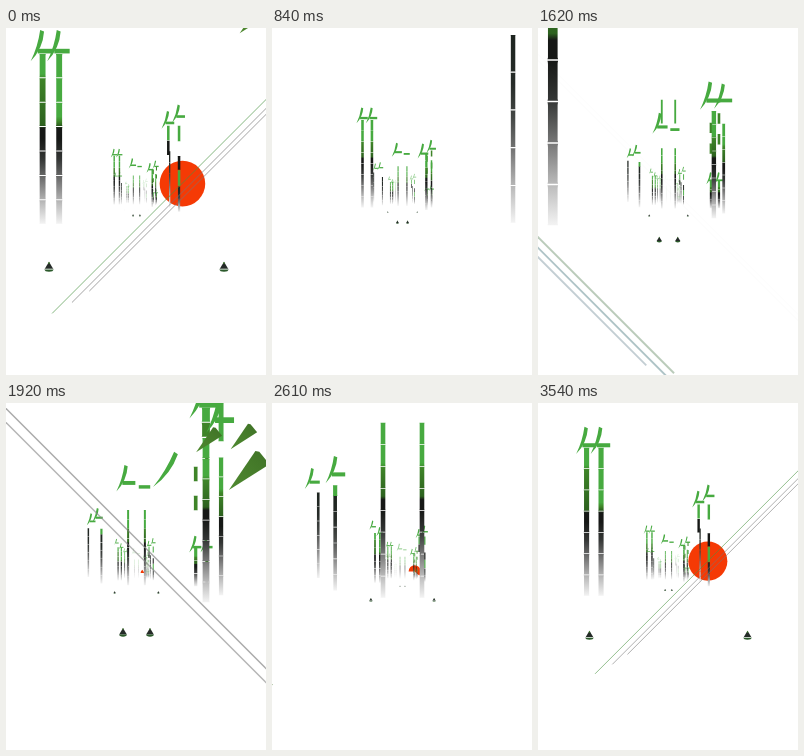
Recreate the animation shown at these times as an HTML page with a canvas. Size 260x347 px, loop 3.57 s.

```html
<!DOCTYPE html>
<html lang="en">
<head>
<meta charset="utf-8">
<title>Bamboo flight</title>
<style>
  html, body { margin: 0; width: 100%; height: 100%; overflow: hidden; background: #fff; }
  canvas { display: block; width: 260px; height: 347px; }
</style>
</head>
<body>
<canvas id="stage" width="260" height="347"></canvas>
<script>
const ctx = document.getElementById('stage').getContext('2d');
const LOOP = 3570, STEP = 30, CYCLE = 3.6;
const CX = 130.5, CY = 173;
const GREEN = '#47aa40', LEAF = '#3e8428', INK = '#161816';

const clamp = (v, a = 0, b = 1) => Math.min(b, Math.max(a, v));
const mix = (a, b, k) => a + (b - a) * k;
const mod = (v, n) => ((v % n) + n) % n;

// World units are pixels seen from one second away; `pass` is when the camera reaches the object.
// head: [time left, dx, y] at the start and the end of its drift; bars: [top, bottom, fill, nearest, farthest]
const stalks = [
  { x: -38.5, pass: .41, top: -60.5, base: 9.5, n: 7, green: .85, head: [1.07, -3, -69, .5, 0, -61.5] },
  { x: -31.7, pass: .41, top: -60.5, base: 9.5, n: 7, green: .6, head: [1.07, 0, -60, .5, 0, -61.5] },
  { x: 34.6, pass: 1.088, size: 1.5, head: [1.09, 0, -85, .73, 0, -85], bars: [[-82, -66, GREEN], [-65.5, -50, INK]] },
  { x: 39.8, pass: 1.2, top: -60, base: 8, n: 5, w: 1.6, dark: true },
  { x: 46.3, pass: 1.088, top: -16, base: 12, n: 2, size: 1.5, dark: true, head: [1.09, 0, -92, .73, 0, -86],
    bars: [[-82, -65, GREEN], [-49, -34, INK], [-33.5, -16.5, GREEN]] },
  { x: -42.4, pass: 1.9, top: -86, base: 7, n: 8, w: 2.7, size: 1.3, head: [1, 0, -88, .5, 0, -88] },
  { x: -32.4, pass: 1.9, top: -86, base: 7, n: 8, w: 2.7, size: 1.3, head: [1, 0, -88, .5, 0, -88] },
  { x: 39.2, pass: 2.484, top: -78, base: 15, n: 8, w: 3.8, size: 1.9, head: [1.13, -5, -78, .56, 0, -97], bars: [[-95, -87, GREEN, .8], [-86.5, -78.5, LEAF, .8]] },
  { x: 47.7, pass: 2.484, top: -67, base: 11, n: 7, size: 1.7, head: [1.13, 0, -86, .56, 0, -88], bars: [[-98, -76, GREEN, .8]] },
  { x: 45, pass: 2.68, top: -22, base: 8, n: 3, head: [1, 0, -22, .5, 0, -22], bars: [[-61, -50], [-83, -72]] },
  { x: 53.5, pass: 2.68, top: -22, base: 8, n: 3, head: [1, 0, -22, .5, 0, -22], bars: [[-71, -60], [-93, -82]] },
  { x: -10.15, pass: 3.131, top: -80, base: 11.5, n: 8, size: 2.5, head: [1.5, -2, -112, .8, -2, -114], bars: [[-153, -117, GREEN, 2, 1.45]] },
  { x: 10.15, pass: 3.131, top: -80, base: 11.5, n: 8, size: 2.2, bare: true, head: [1.2, -3, -108, .88, -2, -102], bars: [[-153, -117, GREEN, 2, 1.45]] },
  { x: -77.5, pass: 3.53, top: -77, base: 2, n: 6, dark: true, size: 1.5, head: [1.28, 5, -88, .6, -14, -85] },
  { x: -50.5, pass: 3.36, top: -60.5, base: 11, n: 6, w: 2.7, dark: true, size: 1.6, head: [1.11, -5, -84, .41, 6, -69], bars: [[-68, -60, GREEN, 2, .7]] }
];

const cones = [{ x: 8.81, pass: 2.573 }, { x: 49, pass: .56, split: true }];

// k: offset from the vanishing point, slope: direction, from..to: horizontal extent
const rays = [
  { k: 11.3, slope: -1, pass: .403, from: -34, to: 160, ink: '#4a9440', far: 1.25 },
  { k: 14.9, slope: -1, pass: .403, from: -26, to: 160, ink: '#777', far: .95 },
  { k: 17.3, slope: -1, pass: .403, from: -19, to: 160, ink: '#777', far: .95 },
  { k: 31.9, slope: 1, pass: 1.8, from: -200, to: 1, ink: '#9ab5b8', far: .7 },
  { k: 30, slope: 1, pass: 1.8, from: -200, to: 1, ink: '#a9bfa9', far: .7 },
  { k: 33.6, slope: 1, pass: 1.8, from: -200, to: -4, ink: '#b5c2c8', far: .7 },
  { k: -8.5, slope: 1, pass: 2.15, from: -200, to: 200, ink: '#777', far: .55 },
  { k: -5.3, slope: 1, pass: 2.15, from: -200, to: 200, ink: '#888', far: .55 }
];

// Tip at phase 0.36 s, speed and size of each dart
const darts = [[103, 137, 363, 1], [137.5, 134, 363, 1.02], [94, 217, 537, 1.56]];

function poly(points, fill) {
  ctx.beginPath();
  points.forEach(([x, y]) => ctx.lineTo(x, y));
  ctx.closePath();
  ctx.fillStyle = fill;
  ctx.fill();
}

function blade(x0, y0, x1, y1, w) {
  const len = Math.hypot(x1 - x0, y1 - y0), nx = (y1 - y0) / len * w, ny = (x0 - x1) / len * w;
  const mx = (x0 + x1) / 2, my = (y0 + y1) / 2;
  ctx.beginPath();
  ctx.moveTo(x0 - nx * .5, y0 - ny * .5);
  ctx.lineTo(x0 + nx * .5, y0 + ny * .5);
  ctx.quadraticCurveTo(mx + nx * 1.7, my + ny * 1.7, x1, y1);
  ctx.quadraticCurveTo(mx + nx * .4, my + ny * .4, x0 - nx * .5, y0 - ny * .5);
  ctx.fillStyle = GREEN;
  ctx.fill();
}

function segment(x, y0, y1, w) {
  const h = w / 2, lip = h * 1.1, cap = Math.min(w * .18, (y1 - y0) / 4);
  ctx.beginPath();
  ctx.moveTo(x - lip, y0);
  ctx.lineTo(x + lip, y0);
  ctx.quadraticCurveTo(x + h, y0 + cap, x + h, y0 + cap * 2);
  ctx.lineTo(x + h, y1 - cap);
  ctx.lineTo(x + lip, y1);
  ctx.lineTo(x - lip, y1);
  ctx.lineTo(x - h, y1 - cap);
  ctx.lineTo(x - h, y0 + cap * 2);
  ctx.quadraticCurveTo(x - h, y0 + cap, x - lip, y0);
  ctx.fill();
}

function bambooFill(base, top, { dark, green = .74 }) {
  const g = ctx.createLinearGradient(0, base, 0, top);
  const stops = dark
    ? [[0, '#f4f4f4'], [.18, '#bdbdbd'], [.38, '#777'], [.56, '#444745'], [.74, '#262b28'], [1, '#1d241f']]
    : [[0, '#f4f4f4'], [.12, '#bdbdbd'], [.25, '#777'], [.38, '#343635'], [.5, INK], [.56, INK],
       [.58, '#2d621f'], [green, LEAF], [green + .03, GREEN], [1, GREEN]];
  stops.forEach(([p, c]) => g.addColorStop(p, c));
  return g;
}

function drawHead(s, tau) {
  const [t0, dx0, y0, t1, dx1, y1] = s.head;
  const k = clamp((t0 - tau) / (t0 - t1)), u = (s.size || 1) / tau;
  const x = CX + (s.x + mix(dx0, dx1, k)) / tau, y = CY + mix(y0, y1, k) / tau;
  ctx.fillStyle = GREEN;
  ctx.fillRect(x - 2 * u, y - .9 * u, 6.3 * u, 1.9 * u);
  if (!s.bare) blade(x - .2 * u, y - 8.3 * u, x - 4.9 * u, y + 4.2 * u, 1.7 * u);
}

function drawStalk(s, tau) {
  const x = CX + s.x / tau, w = Math.max((s.w || 2.4) / tau, .8);
  if (x < -250 || x > 510) return;
  ctx.globalAlpha = clamp((5.2 - tau) / 2);
  if (s.n) {
    const top = CY + s.top / tau, base = CY + s.base / tau, step = (base - top) / s.n;
    const gap = Math.min(.4 / tau, 2.2);
    ctx.fillStyle = bambooFill(base, top, s);
    for (let i = 0; i < s.n; i++) segment(x, top + i * step + gap / 2, top + (i + 1) * step - gap / 2, w);
  }
  for (const [a, b, fill = LEAF, far = 9, near = 0] of s.bars || []) {
    if (tau > far || tau < near) continue;
    ctx.fillStyle = fill;
    segment(x, CY + a / tau, CY + b / tau, w * 1.15);
  }
  if (s.head) drawHead(s, tau);
  ctx.globalAlpha = 1;
}

function drawCone(x, tau, split) {
  const u = 1 / tau, h = 2.5 * u, y0 = CY + 34 * u, y1 = CY + 38.2 * u;
  ctx.globalAlpha = clamp((4.2 - tau) / 1.2);
  poly([[x, y0], [x + h, y1], [x - h, y1]], '#252b28');
  poly([[x, y0], [x + h * .25, y0 + u], [x - h * .25, y0 + u]], LEAF);
  ctx.beginPath();
  ctx.ellipse(x, y1, h, 1.4 * u, 0, 0, Math.PI);
  ctx.fillStyle = '#2c5a2c';
  ctx.fill();
  if (split) {
    ctx.fillStyle = '#e4eee2';
    ctx.fillRect(x - h, y1 - .3 * u, h * 2, .45 * u);
  }
  ctx.globalAlpha = 1;
}

// The disc opens clockwise like a pie while it approaches.
function drawSun(t) {
  const tau = mod(3.957 - t, CYCLE);
  const part = clamp((2.27 - tau) / 1.5);
  if (!part || tau < .02) return;
  const x = CX + 16.4 / tau, y = CY - 6.2 / tau;
  ctx.beginPath();
  if (part < 1) ctx.moveTo(x, y);
  ctx.arc(x, y, 8.14 / tau, Math.PI, Math.PI * (1 + 2 * part));
  ctx.fillStyle = '#f53a05';
  ctx.fill();
}

function drawRay(r, t) {
  const tau = mod(r.pass - t, CYCLE);
  if (tau > r.far || tau < .02) return;
  const y = x => CY + (r.slope * x + r.k) / tau;
  const close = tau < .12;
  ctx.globalAlpha = clamp((r.far - tau) / .4) * (close ? 1 : .8);
  ctx.strokeStyle = close ? '#1f4212' : r.ink;
  ctx.lineWidth = clamp(.34 / tau, .5, 1.9);
  ctx.beginPath();
  ctx.moveTo(CX + r.from / tau, y(r.from));
  ctx.lineTo(CX + r.to / tau, y(r.to));
  ctx.stroke();
  ctx.globalAlpha = 1;
}

function drawDarts(t) {
  const d = mod(t + .4, 1.8) - .76;
  for (const [x0, y0, v, s] of darts) {
    const x = x0 - v * d, y = y0 + v * 1.008 * d;
    const g = ctx.createLinearGradient(x, y, x + 21 * s, y - 21 * s);
    g.addColorStop(0, '#4f8a30');
    g.addColorStop(1, '#427628');
    poly([[x, y], [x + 17 * s, y - 25 * s], [x + 19.5 * s, y - 24.5 * s], [x + 26 * s, y - 16.5 * s]], g);
  }
}

function drawLooseLeaves(t) {
  if (t > 1.2 && t < 1.5) {
    const d = (t - 1.35) * 120;
    blade(59 - d, 146 + d, 28 - d, 135 + d, -5);
  }
  if (t > 1.7 && t < 2.12) {
    const d = (t - 1.92) * 150;
    blade(170 + d, 50 - d, 147 + d, 84 - d, 4.5);
  }
}

function draw(t) {
  ctx.fillStyle = '#fff';
  ctx.fillRect(0, 0, 260, 347);
  drawSun(t);
  // The next round of the forest already shows in the distance.
  [...stalks, ...cones]
    .flatMap(o => [0, CYCLE].map(ahead => ({ o, tau: mod(o.pass - t, CYCLE) + ahead })))
    .filter(({ tau }) => tau > .02 && tau < 5.2)
    .sort((a, b) => b.tau - a.tau)
    .forEach(({ o, tau }) => {
      if (o.base || o.bars) drawStalk(o, tau);
      else [-1, 1].forEach(side => drawCone(CX + side * o.x / tau, tau, o.split));
    });
  rays.forEach(r => drawRay(r, t));
  drawLooseLeaves(t);
  drawDarts(t);
}

const start = performance.now();
function tick() {
  const ms = (performance.now() - start) % LOOP;
  draw(Math.floor(ms / STEP) * STEP / 1000);
  requestAnimationFrame(tick);
}
tick();
</script>
</body>
</html>
```
